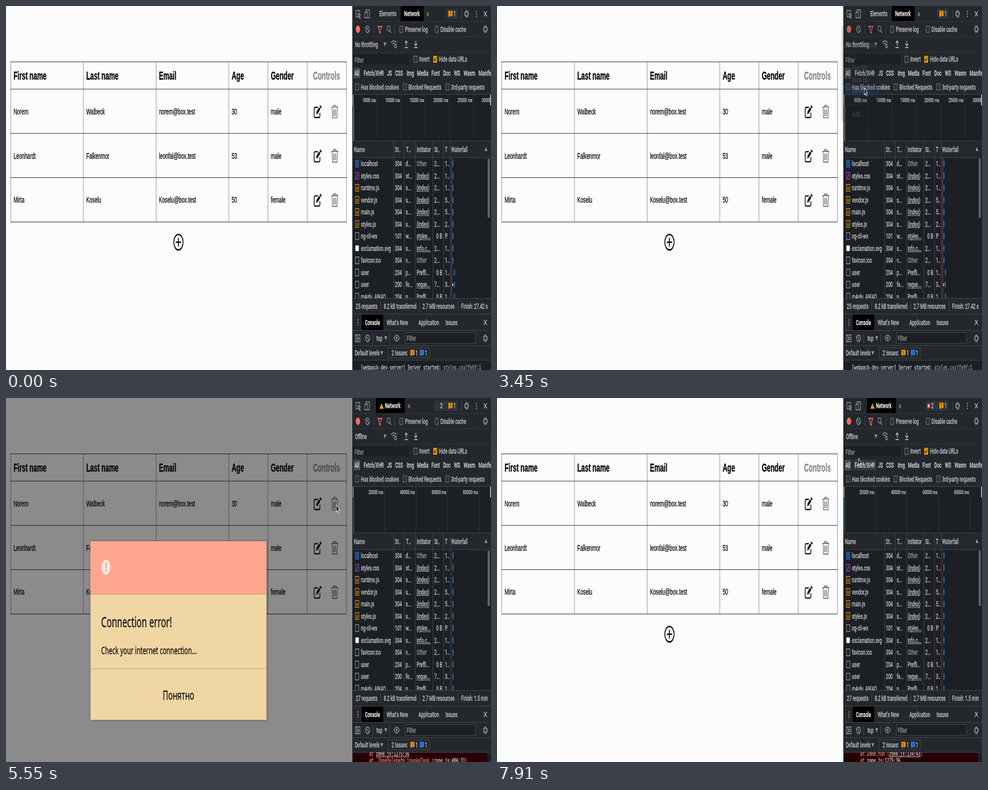
Write an HTML page with a canvas that moves like this. It is 864 by 648 pixels and loops after 8000 ms.

```html
<!DOCTYPE html>
<html lang="en">
<head>
<meta charset="utf-8">
<title>Connection error demo</title>
<style>
html, body { margin: 0; width: 100%; height: 100%; overflow: hidden; background: #fcfcfc; }
canvas { display: block; width: 864px; height: 648px; }
</style>
</head>
<body>
<canvas id="stage" width="864" height="648"></canvas>
<script>
const ctx = document.getElementById('stage').getContext('2d');
const LOOP = 8000;
const SQUEEZE = 0.6;
const UI = 'Roboto, sans-serif', PAGE = '"Liberation Sans", Arial, sans-serif';
const DIALOG = '"Noto Sans", sans-serif', MONO = '"DejaVu Sans Mono", monospace';
const LIGHT = '#ced2d6', GREY = '#989da3', BAR = '#24272b', DARK = '#1c1f23', EDGE = '#42464b', ORANGE = '#f29900';

// Event times in ms
const MENU_OPEN = 2000, MENU_PICK = 3360, OFFLINE = 3540, DELETE = 5130, FAIL = 5500, SETTLED = 5640, CLOSE = 7300;
const between = (t, a, b) => t >= a && t < b;

// ---------- drawing helpers ----------
function at(x, y, draw) {
  ctx.save();
  ctx.translate(x, y);
  ctx.scale(SQUEEZE, 1);
  draw();
  ctx.restore();
}
function rect(x, y, w, h, color) {
  ctx.fillStyle = color;
  ctx.fillRect(x, y, w, h);
}
function frame(x, y, w, h, color, width = 1) {
  ctx.strokeStyle = color;
  ctx.lineWidth = width;
  ctx.strokeRect(x + .5, y + .5, w - 1, h - 1);
}
// The hairline stroke gives the slightly heavy smoothing of a desktop screen
function text(str, x, y, color = LIGHT, size = 12.25, font = UI, weight = 400, align = 'left') {
  at(x, y, () => {
    ctx.font = `${weight} ${size}px ${font}`;
    ctx.textAlign = align;
    ctx.fillStyle = ctx.strokeStyle = color;
    ctx.lineWidth = .3;
    ctx.lineJoin = 'round';
    ctx.fillText(str, 0, 0);
    ctx.strokeText(str, 0, 0);
  });
}
function icon(x, y, path, stroke, width = 1.5, fill) {
  at(x, y, () => {
    const shape = new Path2D(path);
    if (fill) { ctx.fillStyle = fill; ctx.fill(shape); }
    if (stroke) { ctx.strokeStyle = stroke; ctx.lineWidth = width; ctx.stroke(shape); }
  });
}
function ring(x, y, r, stroke, width = 1.5, fill, dash = []) {
  at(x, y, () => {
    ctx.beginPath();
    ctx.arc(0, 0, r, 0, 7);
    if (fill) { ctx.fillStyle = fill; ctx.fill(); }
    if (stroke) {
      ctx.setLineDash(dash);
      ctx.strokeStyle = stroke;
      ctx.lineWidth = width;
      ctx.stroke();
    }
  });
}
function clipped(x, y, w, h, draw) {
  ctx.save();
  ctx.beginPath();
  ctx.rect(x, y, w, h);
  ctx.clip();
  draw();
  ctx.restore();
}

// ---------- small symbols ----------
function gear(x, y) {
  ring(x, y, 5.8, GREY, 2.4, null, [2.4, 2.15]);
  ring(x, y, 4, GREY, 1.8);
}
function kebab(x, y) { for (const d of [-4.5, 0, 4.5]) ring(x, y + d, 1.4, null, 0, GREY); }
function cross(x, y) { icon(x, y, 'M-4.5-4.5L4.5 4.5M4.5-4.5L-4.5 4.5', LIGHT); }
function forbid(x, y) {
  ring(x, y, 5.8, GREY, 1.7);
  icon(x, y, 'M-4-4L4 4', GREY, 1.7);
}
function triangle(x, y, color = GREY) { icon(x, y, 'M-4-3H4L0 4Z', null, 0, color); }
function check(x, y, label, on) {
  icon(x + 3.5, y, 'M-5-5.5H5V5.5H-5Z', on ? ORANGE : '#777b80', 1.2, on ? ORANGE : '#2c2f33');
  if (on) icon(x + 3.5, y, 'M-3 0L-1 3L3-3', '#222', 1.7);
  text(label, x + 10.3, y + 4.5);
}
function issue(x, y, color) {
  icon(x, y, 'M-6-5.5H6V4H-1L-4 7V4H-6Z', null, 0, color);
  text('!', x, y + 3, '#222', 9, UI, 700, 'center');
}

// ---------- web page ----------
const people = [
  ['Norem', 'Walbeck', 'norem@box.test', '30', 'male'],
  ['Leonhardt', 'Falkenmor', 'leonfal@box.test', '53', 'male'],
  ['Mirta', 'Koselu', 'Koselu@box.test', '50', 'female'],
];
const columns = [8, 137.5, 267, 396.5, 466.3, 536.2, 606];

function page(t) {
  rect(0, 0, 617, 648, '#fcfcfc');
  for (const x of columns) rect(x, 99, .8, 286, '#808389');
  for (const y of [99, 147.5, 226.3, 305, 384]) rect(8, y, 599, 1, '#34363c');

  ['First name', 'Last name', 'Email', 'Age', 'Gender'].forEach((h, i) =>
    text(h, columns[i] + 5.4, 130.5, '#000', 19.4, PAGE, 700));
  text('Controls', 571, 130.5, '#85868a', 19.4, PAGE, 700, 'center');

  people.forEach((person, row) => {
    const y = 188 + row * 78.8;
    person.forEach((cell, i) => text(cell, columns[i] + 5.4, y + 4.8, '#080808', 14.6, PAGE));
    if (row === 0 && between(t, DELETE, FAIL)) {
      text('data loading...', 544, y - .8, '#080808', 14.6, PAGE);
      return;
    }
    icon(555, y, 'M1-7.5H-7Q-10-7.5-10-4.5V7.5Q-10 10.5-7 10.5H4Q7 10.5 7 7.5V2', '#141414', 2.3);
    icon(555, y, 'M-4 5L-2.8-.5L5-8L8.5-4.5L1 3.2ZM6-9L8.5-11.5L12.5-8L9.8-5.5Z', null, 0, '#141414');
    icon(585.7, y, 'M-10-8H10M-4-8V-11H4V-8M-8-8L-7 11H7L8-8M-3.5-4V8M0-4V8M3.5-4V8', '#333', 1.2);
  });

  ring(307.2, 420.5, 13.8, '#0b0b0b', 2.6);
  icon(307.2, 420.5, 'M-8 0H8M0-8V8', '#0b0b0b', 2.6);
}

function dialog(hover) {
  rect(0, 0, 617, 648, 'rgba(0,0,0,.45)');
  ctx.save();
  ctx.shadowColor = 'rgba(0,0,0,.4)';
  ctx.shadowBlur = 4;
  rect(150.5, 255, 313.5, 318, '#f0d6a3');
  ctx.restore();
  rect(150.5, 255, 313.5, 94, '#fea68f');
  for (const y of [349, 481.5]) {
    ctx.strokeStyle = '#8d8064';
    ctx.setLineDash([1.2, 1]);
    ctx.lineWidth = 1;
    ctx.beginPath();
    ctx.moveTo(150.5, y + .5);
    ctx.lineTo(464, y + .5);
    ctx.stroke();
    ctx.setLineDash([]);
  }
  ring(178, 301.3, 13.3, null, 0, '#f7e6df');
  icon(178, 301.3, 'M-2-8H2L1.3 2.5H-1.3ZM-1.7 4.5H1.7V7.8H-1.7Z', null, 0, '#f59a86');
  text('Connection error!', 169.6, 407.5, '#0d0d0d', 25.4, DIALOG);
  text('Check your internet connection...', 169.6, 456, '#0d0d0d', 18.3, DIALOG);
  if (hover) frame(247, 503.5, 120.5, 47.5, '#e8221c', 1.2);
  text('Понятно', 307.3, 536.5, hover ? '#e8130d' : '#0d0d0d', 22, DIALOG, 400, 'center');
}

// ---------- developer tools ----------
const requests = [
  ['localhost', '304', 'd...', 'Other', '2...', '1..', '#2f7df6'],
  ['styles.css', '304', 'st...', '(index)', '2...', '1..', '#a24be0'],
  ['runtime.js', '304', 's...', '(index)', '2...', '1..', ORANGE],
  ['vendor.js', '304', 's...', '(index)', '2...', '5..', ORANGE],
  ['main.js', '304', 's...', '(index)', '2...', '5..', ORANGE],
  ['styles.js', '304', 's...', '(index)', '2...', '2..', ORANGE],
  ['ng-cli-ws', '101', 'w...', 'styles...', '0 B', 'P.', GREY],
  ['exclamation.svg', '304', 's...', 'info.c...', '2...', '1..', '#fff'],
  ['favicon.ico', '304', 'v...', 'Other', '2...', '1..', GREY],
  ['user', '204', 'p...', 'Prefli...', '0 B', '1..', GREY],
  ['user', '200', 'fe...', 'reque...', '7...', '3..', GREY],
  ['m4qlu_AIK4Q', '204', 'p...', 'Prefli...', '0 B', '1..', GREY],
];

function toolbar(offline, failed, t) {
  rect(617, 0, 247, 157, BAR);
  for (const y of [27, 54, 82]) rect(617, y, 247, 1, '#34373b');

  icon(627, 14, 'M5-1V-6H-6V5H-2M0-1L7 2L4 3L7 7L5 8L2 4L0 6Z', GREY);
  icon(643.5, 14, 'M-4-4V-7H7V7H2M-7-3H1V7H-7Z', GREY);
  const tabX = failed ? 659 : 703, tabW = offline ? 51.5 : 41;
  if (!failed) text('Elements', 665, 18.2);
  rect(tabX, 0, tabW, 27, '#000');
  if (offline) {
    icon(tabX + 10, 14, 'M0-5L6 5H-6Z', null, 0, '#fbbc04');
    icon(tabX + 10, 14, 'M0-2V2M0 3V4', '#333', 1.2);
  }
  text('Network', tabX + (offline ? 16 : 6.3), 18.2, '#fff', 12.3, UI, 500);
  text('»', tabX + tabW + 5, 18.5, GREY, 17);
  rect(failed ? 763 : 784, 5, failed ? 42 : 21, 18, '#303337');
  if (failed) {
    if (t > SETTLED) {
      ring(769, 14, 4.6, null, 0, '#e34a40');
      icon(769, 14, 'M-2-2L2 2M2-2L-2 2', '#fff', 1.2);
    }
    text('2', 773.5, 18);
  }
  issue(791.7, 14, ORANGE);
  text('1', 797, 18);
  rect(811, 5, 1, 18, EDGE);
  gear(820.5, 14);
  kebab(838, 14);
  cross(854, 14);

  ring(627, 41.3, 6.5, null, 0, '#f0716a');
  forbid(644, 41.3);
  rect(655, 32, 1, 18, EDGE);
  icon(666, 41.5, 'M-6-5H6L2 1V7L-2 5V1Z', '#f0716a', 1.8);
  ring(681.5, 39.8, 4.5, GREY, 1.6);
  icon(681.5, 39.8, 'M3.2 3.2L8 8', GREY, 1.8);
  rect(692, 32, 1, 18, EDGE);
  check(700.5, 41.3, 'Preserve log');
  check(763.8, 41.3, 'Disable cache');
  gear(854, 41.3);

  text(offline ? 'Offline' : 'No throttling', 621.7, 73);
  triangle(675, 68);
  icon(691, 68, 'M-8-3Q0-9 8-3M-5 0Q0-4 5 0M-1 3H0', GREY, 1.6);
  ring(694, 71.5, 3, GREY, 1.6);
  icon(713, 68, 'M0 3V-6M-4-2L0-6L4-2M-5 6H5', LIGHT);
  icon(730, 68, 'M0-6V3M-4-1L0 3L4-1M-5 6H5', LIGHT);

  rect(618, 86, 101, 18, DARK);
  text('Filter', 621, 100.5, GREY);
  check(726, 94.8, 'Invert');
  check(761, 94.8, 'Hide data URLs', true);

  rect(619, 110, 12, 19, '#45484c');
  if (t > 7800) rect(634, 110, 42, 19, '#34373b');
  const filters = { All: 621, 'Fetch/XHR': 637.3, JS: 679, CSS: 693.3, Img: 714, Media: 732.3, Font: 758, Doc: 779, WS: 798, Wasm: 815.3, Manifest: 842 };
  for (const name in filters) text(name, filters[name], 124.2, '#eceff1');
  check(622, 144, 'Has blocked cookies');
  check(706.8, 144, 'Blocked Requests');
  check(782.8, 144, '3rd-party requests');
}

function timeline(failed) {
  rect(617, 157, 247, 84, DARK);
  rect(617, 157, 247, 1, EDGE);
  const gap = failed ? 56.2 : 43, unit = failed ? 20000 : 5000;
  for (let i = 1; i <= 6; i++) {
    const x = 617.7 + i * gap;
    rect(x, 158, .8, 82, '#34373c');
    text(`${i * unit} ms`, x - 1.8, 171, LIGHT, 9.9, UI, 400, 'right');
  }
  rect(618.8, 177, 1, 63, failed ? '#41777b' : '#a9b4b5');
  rect(617.5, 158, 1.5, 19, '#c9ccd0');
  rect(862.5, 158, 1.5, 19, '#c9ccd0');
}

function fileIcon(x, y, color, row) {
  if (row === 7) return rect(x - 3, y - 5, 6, 10, '#fff');
  icon(x, y, 'M-5-6H5V6H-5Z', color, 1.3);
  if (row === 0) icon(x, y, 'M-3-3H3M-3 0H3M-3 3H3', color, 1.8);
  if (row === 1) icon(x, y, 'M-2 3L3-3', color, 1.6);
  if (between(row, 2, 6)) ring(x, y + 1, 2, color, 1.2);
}

function requestList(failed) {
  rect(617, 240, 247, 280, DARK);
  rect(617, 240, 247, 30, BAR);
  rect(617, 240, 247, 1, EDGE);
  rect(617, 269.5, 247, 1, EDGE);
  const heads = { Name: 619.7, 'St..': 692.8, 'T...': 712.8, Initiator: 731.8, 'Si..': 763, T: 782, Waterfall: 793 };
  for (const name in heads) text(name, heads[name], 259.5);
  icon(855, 255, 'M-4 3H4L0-4Z', null, 0, GREY);

  clipped(617, 270, 247, 250, () => {
    for (const x of [813, 836]) rect(x, 270, .6, 250, '#282b2f');
    rect(792.8, 270, .8, 250, failed ? '#2a2f4c' : '#31469c');
    rect(793.8, 270, .8, 250, failed ? '#5c2e35' : '#8d3540');
    requests.forEach(([name, status, type, initiator, size, time, color], row) => {
      const y = 280.6 + row * 21.52, base = y + 4.4;
      fileIcon(625.5, y, color, row);
      text(name, 632.3, base);
      text(status, 692.8, base);
      text(type, 712, base);
      const linked = /^(\(index|styles|info|reque)/.test(initiator);
      text(initiator, 731.5, base, initiator === 'Other' ? GREY : LIGHT);
      if (linked) rect(731.5, base + 1.5, initiator === '(index)' ? 21.5 : 25, .8, LIGHT);
      text(size, size === '0 B' ? 777 : 763, base, LIGHT, 12.25, UI, 400, size === '0 B' ? 'right' : 'left');
      text(time, 782, base);
      const late = !failed && row > 8;
      rect(late ? 798 : 795.7, y - 5.5, 1.3, 11, '#1697e8');
      if (row === 10 && !failed) rect(795, y - 2, 1.5, 5, '#d5d9de');
    });
  });
  for (const x of [690, 709, 729, 760, 779, 791]) rect(x, 241, .8, 279, '#474a4f');
  rect(858, 272, 4, failed ? 98 : 105, '#5f6266');
}

function drawer(failed, t) {
  rect(617, 520, 247, 111, BAR);
  for (const y of [520, 548, 577, 604, 630]) rect(617, y, 247, 1, EDGE);
  text(failed ? '27 requests' : '25 requests', 623.3, 539);
  text('8.2 kB transferred', 673, 539);
  text('2.7 MB resources', 742, 539);
  text(failed ? 'Finish: 1.5 min' : 'Finish: 27.42 s', 810.8, 539);
  for (const x of [667, 736.5, 805]) rect(x, 526, 1, 17, EDGE);

  kebab(627, 563.5);
  rect(633.5, 549, 38.5, 28, '#000');
  text('Console', 639.5, 567.7, '#fff', 12.1, UI, 500);
  text("What's New", 678, 567.7);
  text('Application', 734.7, 567.7);
  text('Issues', 783, 567.7);
  cross(854, 563.3);

  icon(626.5, 591.5, 'M-7-6H7V6H-7ZM-3-6V6M0-3L5 0L0 3Z', GREY, 1.4);
  forbid(644, 591.5);
  rect(653, 582, 1, 18, EDGE);
  text('top', 660, 595.7);
  triangle(676.5, 591);
  rect(683, 582, 1, 18, EDGE);
  icon(696, 591, 'M-8 0Q0-10 8 0Q0 10-8 0Z', GREY, 1.6);
  ring(696, 591, 2.4, null, 0, GREY);
  rect(711, 581, 126, 20, DARK);
  frame(711, 581, 126, 20, EDGE);
  text('Filter', 714, 595.7, GREY);
  gear(854, 591.5);

  text('Default levels', 621.5, 622.3);
  triangle(669.5, 617.5);
  frame(680, 608, 74.5, 19, EDGE);
  text('2 Issues:', 687, 622.3);
  issue(724, 617.5, ORANGE);
  text('1', 729.5, 622.3);
  issue(741, 617.5, '#2f7df6');
  text('1', 746.3, 622.3);

  clipped(617, 631, 247, 17, () => consoleOutput(failed, t));
}

function consoleOutput(failed, t) {
  rect(617, 631, 247, 17, DARK);
  const mono = (s, x, y, color, link) => {
    text(s, x, y, color, 11, MONO);
    if (link) rect(x, y + 1.3, s.length * 11 * .602 * SQUEEZE, .9, color);
  };
  if (!failed) {
    mono('[webpack-dev-server] Server started: ', 632, 646.5, '#d6d9dc');
    mono('styles.css?fe9f:1', 779, 646.5, GREY, true);
    return;
  }
  rect(617, 632, 240, 16, '#290003');
  const trace = [
    ['at Zone.run (', 'zone.js:134:43', ')'],
    ['at ', 'zone.js:1275:36', ''],
    ['at _ZoneDelegate.invokeTask (', 'zone.js:406:31', ')'],
  ];
  trace.forEach(([before, link, after], i) => {
    const y = (t > SETTLED ? 637 : 625) + i * 12.2, step = 11 * .602 * SQUEEZE;
    mono(before, 647, y, '#f28b82');
    mono(link, 647 + before.length * step, y, '#e8d4d3', true);
    mono(after, 647 + (before.length + link.length) * step, y, '#f28b82');
  });
}

function menu(pointerY, alpha) {
  ctx.save();
  ctx.globalAlpha = alpha;
  ctx.beginPath();
  ctx.roundRect(614.5, 34.5, 68.5, 172, 4);
  ctx.fillStyle = '#2b2c2f';
  ctx.strokeStyle = '#55575b';
  ctx.lineWidth = 1;
  ctx.shadowColor = 'rgba(0,0,0,.5)';
  ctx.shadowBlur = 6;
  ctx.fill();
  ctx.shadowBlur = 0;
  ctx.stroke();
  ['Disabled', 'No throttling', 'Presets', 'Fast 3G', 'Slow 3G', 'Offline', 'Custom', 'Add...'].forEach((label, i) => {
    const y = 49 + i * 20.55, title = [0, 2, 6].includes(i);
    if (!title && Math.abs(pointerY - y) < 10.3) rect(617, y - 10, 63.5, 20.5, '#1666d2');
    text(label, title ? 625.5 : 633, y + 4.6, title ? '#6d6f73' : '#f0f1f2', 12.6);
  });
  icon(621, 69.8, 'M-4 0L-1 4L4-5', '#fff', 1.7);
  ctx.restore();
}

// ---------- pointer ----------
const route = [
  [800, 700, 662], [1850, 671, 72], [2500, 671, 72], [3050, 654.5, 146], [3550, 654.5, 146],
  [4700, 588.8, 190.5], [5850, 588.8, 190.5], [6700, 308.5, 537.5], [7370, 308.5, 537.5], [7890, 644, 107.5],
];
function pointerAt(t) {
  const i = route.findIndex(stop => stop[0] > t);
  if (i === 0) return route[0].slice(1);
  if (i < 0) return route[route.length - 1].slice(1);
  const [t0, x0, y0] = route[i - 1], [t1, x1, y1] = route[i];
  const u = (t - t0) / (t1 - t0), e = u * u * (3 - 2 * u);
  return [x0 + (x1 - x0) * e, y0 + (y1 - y0) * e];
}
function pointer(x, y, hand, t) {
  if ([MENU_OPEN, MENU_PICK, DELETE, CLOSE].some(click => between(t, click - 200, click)))
    ring(x, y, 25, '#16130f', 1.3);
  if (hand) icon(x, y, 'M-2 0Q0-2 1 0V5Q8 5 8 8Q8 13 5 15H-2L-7 8Q-5 6-2 8Z', '#111', 1.3, '#fff');
  else icon(x, y, 'M0 0V12L3 9.5L5.2 14L7.4 13L5.3 8.7H9Z', '#fff', 1.1, '#000');
}

// ---------- scene ----------
function render(t) {
  const offline = t >= OFFLINE, failed = t >= FAIL;
  const [x, y] = pointerAt(t);
  const onButton = between(t, FAIL, CLOSE) && between(x, 247, 368) && between(y, 503, 552);
  page(t);
  if (between(t, FAIL, CLOSE)) dialog(onButton);
  clipped(617, 0, 247, 648, () => {
    toolbar(offline, failed, t);
    timeline(failed);
    requestList(failed);
    drawer(failed, t);
    rect(617, 0, 1, 648, '#17191c');
  });
  if (between(t, MENU_OPEN, OFFLINE)) menu(y + 5, Math.max(0, Math.min(1, 1 - (t - MENU_PICK) / 105)));
  pointer(x, y, onButton, t);
}
function tick() {
  render(performance.now() % LOOP);
  requestAnimationFrame(tick);
}
tick();
</script>
</body>
</html>
```
